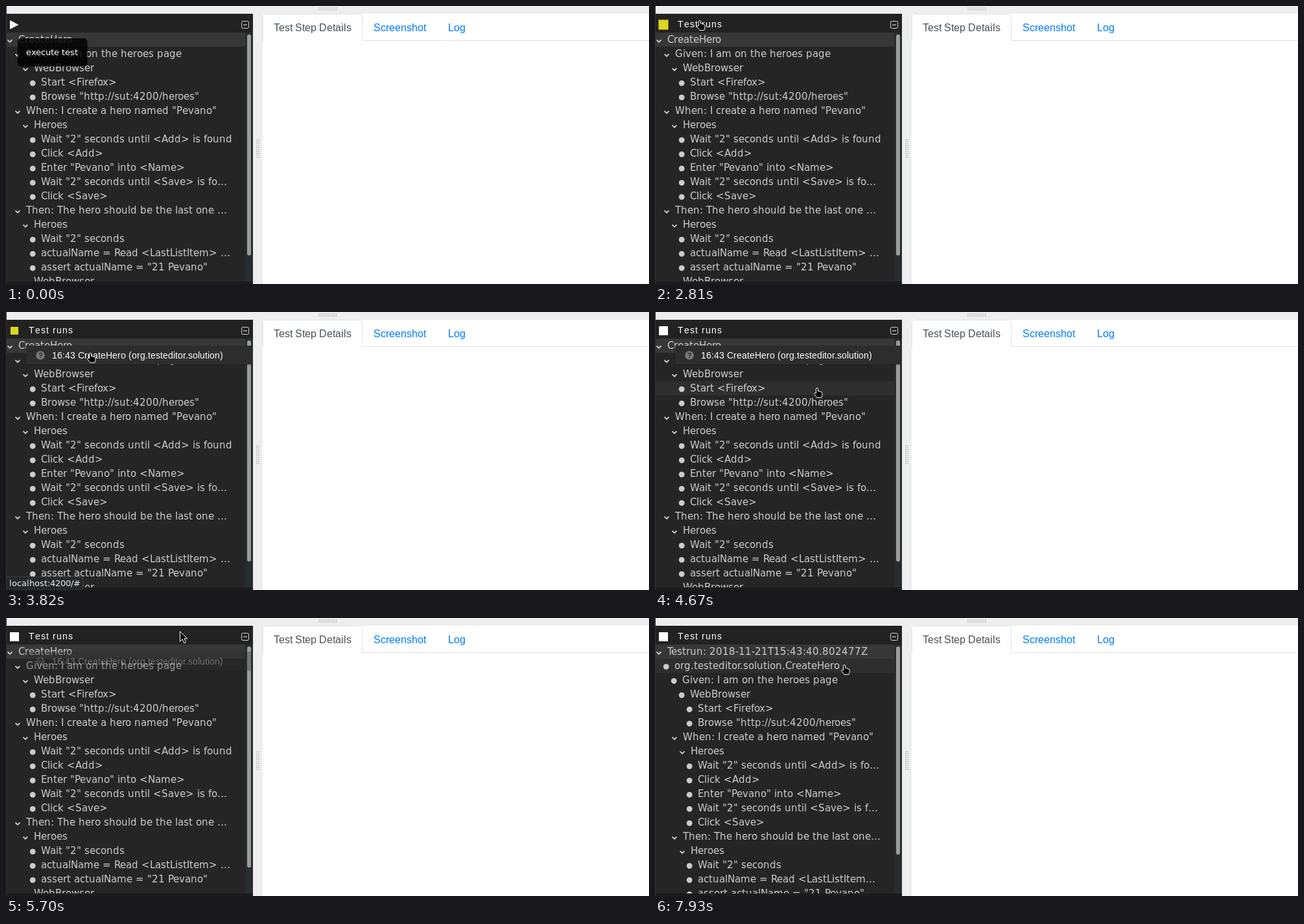
An HTML page that plays this animation: 992x430 px, repeating every 8 s.

```html
<!DOCTYPE html>
<html lang="en">
<head>
<meta charset="utf-8">
<title>Test execution</title>
<style>
html, body { margin: 0; width: 100%; height: 100%; overflow: hidden; background: #eee; }
svg { display: block; width: 992px; height: 430px; }
text { white-space: pre; }
</style>
</head>
<body>
<svg id="stage" viewBox="0 0 992 430" xmlns="http://www.w3.org/2000/svg"></svg>
<script>
const LOOP = 8000;
const TREE_FONT = "'DejaVu Sans', sans-serif";
const UI_FONT = "'Liberation Sans', Arial, sans-serif";
const stage = document.getElementById("stage");
const pen = document.createElement("canvas").getContext("2d");

function add(parent, tag, attrs = {}) {
  const node = document.createElementNS(stage.namespaceURI, tag);
  for (const key in attrs) node.setAttribute(key, attrs[key]);
  parent.appendChild(node);
  return node;
}
const group = (parent, attrs) => add(parent, "g", attrs);
const rect = (parent, x, y, width, height, fill, more) =>
  add(parent, "rect", { x, y, width, height, fill, ...more });
const path = (parent, d, more) => add(parent, "path", { d, fill: "none", ...more });

// Text whose glyph advances snap to whole pixels, as with hinted fonts.
function label(parent, str, x, y, size, family, fill, spacing = 0) {
  pen.font = size + "px " + family;
  const w = s => pen.measureText(s).width;
  const xs = [];
  let at = x;
  for (let i = 0; i < str.length; i++) {
    xs.push(Math.round(at));
    const a = str[i], b = str[i + 1];
    const kern = b && !spacing ? w(a + b) - w(a) - w(b) : 0;
    at += Math.round(w(a)) + kern + spacing;
  }
  const node = add(parent, "text", { x: xs.join(" "), y, fill, "font-size": size, "font-family": family });
  node.textContent = str;
  return node;
}

function dots(x, y, cols, rows) {
  for (let i = 0; i < cols; i++)
    for (let j = 0; j < rows; j++) rect(stage, x + i * 3, y + j * 3, 2, 2, "#ccc");
}

// Each line: level, "v" for an open node or "o" for a leaf, caption.
const HERO = "Pevano";
const STEPS = [
  [1, "v", "Given: I am on the heroes page"],
  [2, "v", "WebBrowser"],
  [3, "o", "Start <Firefox>"],
  [3, "o", 'Browse "http://sut:4200/heroes"'],
  [1, "v", `When: I create a hero named "${HERO}"`],
  [2, "v", "Heroes"],
  [3, "o", 'Wait "2" seconds until <Add> is found'],
  [3, "o", "Click <Add>"],
  [3, "o", `Enter "${HERO}" into <Name>`],
  [3, "o", 'Wait "2" seconds until <Save> is fo…'],
  [3, "o", "Click <Save>"],
  [1, "v", "Then: The hero should be the last one …"],
  [2, "v", "Heroes"],
  [3, "o", 'Wait "2" seconds'],
  [3, "o", "actualName = Read <LastListItem> …"],
  [3, "o", `assert actualName = "21 ${HERO}"`],
  [2, "v", "WebBrowser"]
];
const SHORTER = {
  6: 'Wait "2" seconds until <Add> is fo…',
  9: 'Wait "2" seconds until <Save> is f…',
  11: "Then: The hero should be the last one…",
  14: "actualName = Read <LastListItem…"
};
const planTree = [[0, "v", "CreateHero"], ...STEPS];
const runTree = [
  [0, "v", "Testrun: 2018-11-21T15:43:40.802477Z"],
  [1, "o", "org.testeditor.solution.CreateHero"],
  ...STEPS.slice(0, 16).map(([level, kind, str], i) =>
    [level + 1, i < 2 ? "o" : kind, SHORTER[i] || str])
];

function drawTree(parent, lines, thumbEnd) {
  const g = group(parent);
  lines.forEach(([level, kind, str], i) => {
    const x = level * 12, y = 41 + i * 22;
    if (kind === "v") {
      path(g, `M${x + 2.6} ${y + 11.4}l3.4 3.4l3.4 -3.4`, { stroke: "#d8d8d8", "stroke-width": 1.8 });
    } else {
      add(g, "circle", { cx: x + 5.2, cy: y + 12.3, r: 4.4, fill: "#ccc" });
    }
    label(g, str, x + (kind === "v" ? 19 : 18), y + 16, 15, TREE_FONT, "#ccc");
  });
  rect(g, 369, 41, 12, 385, "#272d2e");
  rect(g, 372, 44, 6, thumbEnd - 44, "#9c9c9c", { rx: 3 });
  return g;
}

// Page frame and splitters
rect(stage, 0, 0, 992, 430, "#eee");
rect(stage, 0, 0, 1, 430, "#333");
dots(482, 2, 10, 2);
dots(386, 206, 2, 10);

// Details panel
rect(stage, 396, 12, 596, 418, "#fff");
path(stage, "M396.5 54V16.5a4 4 0 0 1 4 -4H545.5a4 4 0 0 1 4 4V53.5H992", { stroke: "#dee2e6" });
label(stage, "Test Step Details", 413, 39, 16, UI_FONT, "#495057");
label(stage, "Screenshot", 567, 39, 16, UI_FONT, "#007bff");
label(stage, "Log", 682, 39, 16, UI_FONT, "#007bff");

// Tree panel
rect(stage, 1, 12, 380, 418, "#252525");
rect(stage, 1, 12, 380, 29, "#222");
const clip = add(add(stage, "defs"), "clipPath", { id: "view" });
rect(clip, 1, 41, 380, 385, "#000");
const view = group(stage, { "clip-path": "url(#view)" });
rect(view, 1, 41, 368, 22, "#373737");
const hover = rect(view, 1, 0, 368, 22, "#2e2e2e");
const plan = drawTree(view, planTree, 386);
const run = drawTree(view, runTree, 366);
rect(stage, 1, 426, 380, 4, "#1c1c1c");

// Toolbar
rect(stage, 363.5, 23.5, 11, 11, "none", { rx: 2, stroke: "#d4d4d4" });
rect(stage, 366, 28.5, 6, 1.2, "#d4d4d4");
const play = path(stage, "M6 22L19.5 29L6 36Z");
const ring = rect(stage, 5.5, 20.5, 15, 16, "none",
  { stroke: "#a8501c", "stroke-dasharray": "1.5 2" });
const square = add(stage, "polygon");
const runsTitle = label(stage, "Test runs", 35, 33, 14, UI_FONT, "#fff", 1);

// Drop-down with the list of runs
const menu = group(stage);
rect(menu, 30, 52, 351, 31, "#000", { opacity: 0.15 });
rect(menu, 31, 52, 350, 29, "#2d2d2d");
add(menu, "circle", { cx: 53, cy: 67, r: 6.8, fill: "#777" });
add(menu, "text", { x: 53, y: 71, fill: "#2d2d2d", "font-size": 11, "font-weight": 700,
  "font-family": UI_FONT, "text-anchor": "middle" }).textContent = "?";
label(menu, "16:43 CreateHero (org.testeditor.solution)", 71, 72, 14, UI_FONT, "#fff");

const tip = group(stage);
rect(tip, 18, 50, 107.5, 43.5, "#000", { rx: 5, opacity: 0.84 });
label(tip, "execute test", 31, 76, 13, TREE_FONT, "#fff");

const status = group(stage);
path(status, "M0 409.5H115.5a3 3 0 0 1 3 3V430H0Z", { fill: "#242829", stroke: "#3a3f40" });
label(status, "localhost:4200/#", 5, 424, 13, TREE_FONT, "#eee");

// Pointers, drawn from the top left of their box
const ink = { fill: "#000", stroke: "#fff", "stroke-linejoin": "round" };
const hand = path(stage,
  "M3.5 9V2Q3.5 .5 5 .5T6.5 2V5.5Q8 4.8 8.8 6Q10.2 5.5 11 6.8Q13 6.5 13 8.5V12L11.8 15.5H5L1 10.5Q.2 9 1.2 8.4T3.5 9Z", ink);
const arrow = path(stage, "M.5 .8V16.2L4.2 12.8L6.8 18.8L9.4 17.7L6.9 11.9H12Z", ink);

// Pointer path: time, x, y
const TRACK = [
  [2100, 33, 33], [2270, 33, 33], [2600, 64, 22], [3120, 64, 22], [3580, 125, 63],
  [3870, 125, 63], [4510, 199, 79], [4670, 245, 117], [4950, 262, 104],
  [5350, 267, 28], [5470, 268, 20], [5700, 268, 20], [6240, 287, 72], [LOOP, 287, 72]
];

const clamp = v => Math.max(0, Math.min(1, v));
const ramp = (t, a, b) => clamp((t - a) / (b - a));
const smooth = v => v * v * (3 - 2 * v);
const show = (node, on) => node.setAttribute("display", on ? "inline" : "none");

function pointerAt(t) {
  let i = 1;
  while (i < TRACK.length - 1 && TRACK[i][0] < t) i++;
  const [t0, x0, y0] = TRACK[i - 1], [t1, x1, y1] = TRACK[i];
  const k = smooth(ramp(t, t0, t1));
  return [Math.round(x0 + (x1 - x0) * k), Math.round(y0 + (y1 - y0) * k)];
}

// Square turned about the x and then the y axis, in perspective
function flip(t, half) {
  const turn = start => Math.PI * smooth(ramp(t, start, start + 830));
  const start = t < 7000 ? 3730 : 7050;
  const a = turn(start), b = turn(start + 830);
  return [[-1, -1], [1, -1], [1, 1], [-1, 1]].map(([u, v]) => {
    const z = half * (v * Math.sin(a) + u * Math.sin(b));
    const s = half * 120 / (120 - z);
    return `${13 + u * Math.cos(b) * s},${29 + v * Math.cos(a) * s}`;
  }).join(" ");
}

function draw(t) {
  show(tip, t < 500);
  show(play, t < 790);
  play.setAttribute("fill", t < 500 ? "#fff" : "#bbb");
  show(square, t >= 790);
  show(ring, t >= 790 && t < 2950);
  const white = t >= 4145;
  square.setAttribute("points", flip(t, white ? 7 : t < 2950 ? 7.5 : 6));
  square.setAttribute("fill", white ? "#fff" : "#d8d820");
  show(runsTitle, t >= 1030);

  const alpha = ramp(t, 2980, 3180) * (1 - ramp(t, 5630, 5740));
  menu.setAttribute("opacity", alpha);
  show(menu, alpha > 0);
  show(status, t >= 3760 && t < 4600);
  show(plan, t < 5900);
  show(run, t >= 5900);

  const [x, y] = pointerAt(t);
  const visible = t >= 2100;
  const onButton = y < 41 && x > 110;
  show(hand, visible && !onButton);
  show(arrow, visible && onButton);
  hand.setAttribute("transform", `translate(${x} ${y})`);
  arrow.setAttribute("transform", `translate(${x} ${y})`);

  const row = Math.floor((y + 1 - 41) / 22);
  const overMenu = alpha > 0.5 && y < 81;
  show(hover, visible && row > 0 && !overMenu);
  hover.setAttribute("y", 41 + row * 22);
}

function tick(now) {
  draw(now % LOOP);
  requestAnimationFrame(tick);
}
draw(0);
requestAnimationFrame(tick);
</script>
</body>
</html>
```
